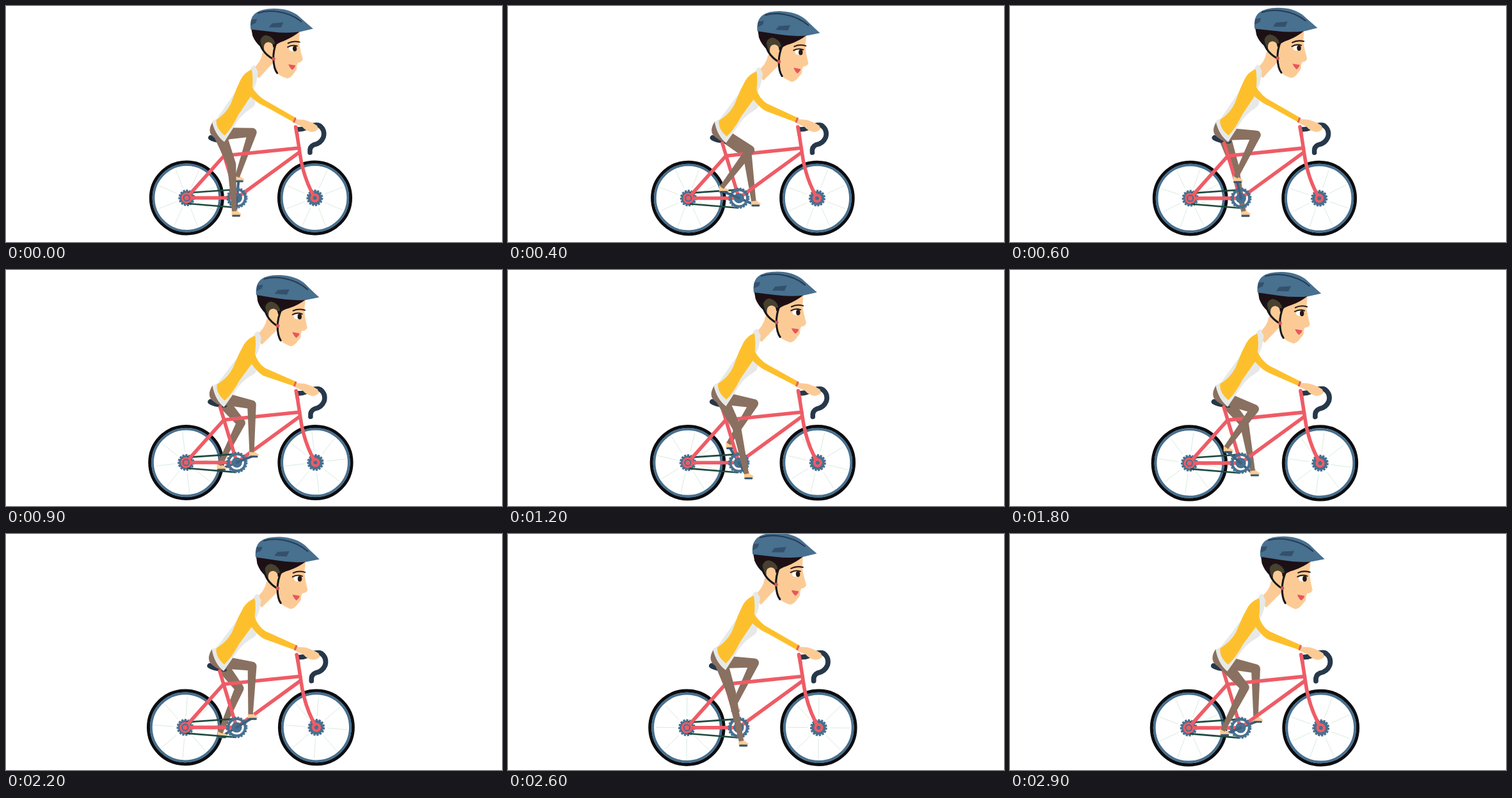
These frames come from a looping animation (775 px wide and 369 px high, 3 s). An HTML page:

```html
<!DOCTYPE html>
<html lang="en">
<head>
<meta charset="utf-8">
<title>Cyclist</title>
<style>
html, body { margin: 0; width: 100%; height: 100%; overflow: hidden; background: #fff; }
svg { display: block; width: 775px; height: 369px; }
.line { fill: none; stroke-linecap: round; stroke-linejoin: round; }
.red { stroke: #ee5c66; stroke-width: 5.5; }
.navy { stroke: #26384a; }
.chain { stroke: #1f4a3f; stroke-width: 2.6; }
.crank { stroke: #3c6280; stroke-width: 4; }
.spokes { fill: none; stroke: #cfe6d4; stroke-width: .8; }
.blue { fill: #48708f; }
.slit { fill: #34506c; }
.skin { fill: #fccb95; }
.pants { fill: #8a7060; }
.yellow { fill: #fdc02c; }
.white { fill: #e7e9e8; }
.hair { fill: #1d1015; }
.strap { stroke: #17171a; stroke-width: 3; }
</style>
</head>
<body>
<svg viewBox="0 0 775 369" xmlns="http://www.w3.org/2000/svg">
  <defs>
    <g id="wheel">
      <circle r="56" fill="none" stroke="#0d0d10" stroke-width="5"/>
      <circle r="51.8" fill="none" stroke="#48708f" stroke-width="3.8"/>
    </g>
    <g id="hub">
      <circle r="11" class="blue"/>
      <circle r="11.5" fill="none" stroke="#48708f" stroke-width="3" stroke-dasharray="3.2 1.6"/>
    </g>
    <g id="foot">
      <path class="skin" d="M-6-9L2-9L3-6L9-2L8 0L-6 0Z"/>
      <path class="line" stroke="#35566f" stroke-width="3" d="M-4 1H6"/>
    </g>
  </defs>
  <g id="scene">
    <use href="#wheel" x="282.3" y="300"/>
    <use href="#wheel" x="482.5" y="300"/>
    <path class="spokes" id="spokeA"/>
    <path class="spokes" id="spokeB"/>

    <path class="line crank" id="crankFar"/>
    <use href="#foot" id="footFar"/>
    <path class="pants" id="legFar"/>

    <use href="#hub" x="282.3" y="300"/>
    <use href="#hub" x="482.5" y="300"/>
    <path class="line chain" d="M285 292L358 287M285 309L358 315"/>
    <path class="line navy" stroke-width="8" d="M320 206Q325 210 342 211"/>
    <g class="line red">
      <path d="M335 214L360 297"/>
      <path d="M360 300H282L340 235"/>
      <path d="M342 234L458 222"/>
      <path d="M362 299L458 229"/>
      <path d="M453 190L459 229Q464 268 482.5 300"/>
    </g>
    <circle cx="282.3" cy="300" r="8.5" fill="#ee5c66"/>
    <circle cx="282.3" cy="300" r="4.6" fill="#ee5c66" stroke="#48708f" stroke-width="2"/>
    <circle cx="482.5" cy="300" r="7" fill="#ee5c66"/>
    <circle cx="482.5" cy="300" r="3" class="blue"/>
    <g transform="translate(361 300)">
      <circle r="13" fill="none" stroke="#48708f" stroke-width="4"/>
      <circle r="15.5" fill="none" stroke="#48708f" stroke-width="2" stroke-dasharray="3 1.9"/>
      <circle r="8" class="blue"/>
    </g>

    <path class="line navy" stroke-width="7.5" d="M456 193Q463 193 470 190Q484 184 490 187Q499 194 496 205Q492 215 481 217Q474 220 475 229"/>
    <path class="line red" d="M452.5 189L455 202"/>

    <path class="line crank" id="crankNear"/>
    <use href="#foot" id="footNear"/>
    <path class="pants" id="legNear"/>
    <path class="pants" d="M323 181Q315 194 321 202Q327 209 341 214L353 205L340 185Z"/>

    <g id="body">
      <path class="skin" d="M409 75L424 92L399 117L388 104Q404 92 406 78Z"/>
      <path class="white" d="M389 98L393 96L398 106Q396 124 390 134Q388 142 392 150Q393 159 386 163Q371 171 362 184L341 214Q327 203 323 181L331 177L380 112Z"/>
      <path class="yellow" d="M388 103Q377 107 371 117Q363 131 357 147Q350 167 330 179Q328 192 342 204Q353 194 365 172L384 146Q391 130 389 106Z"/>

      <path class="skin" d="M408 62L428 58L466 45L464 64L466 77L469 90Q467 95 461 95L459 100Q460 106 455 110Q449 119 443 119Q433 115 427 110L420 86L409 78Z"/>
      <path class="hair" d="M390 36L392 50Q396 61 404 68L409 71L414 63L424 70Q429 63 441 60Q455 55 467 46L466 42Z"/>
      <path fill="#48412f" d="M403 62Q404 51 413 50Q425 53 427 64L418 66L410 78Q404 71 403 62Z"/>
      <path class="skin" d="M409 72Q408 61 417 61Q425 63 423 72Q421 82 415 82Q410 80 409 72Z"/>
      <path class="line strap" d="M402 55Q403 76 423 88M429 61Q423 75 423 88Q423 103 428 110"/>
      <circle cx="423.3" cy="87.5" r="2.7" fill="#d5525a"/>

      <path class="blue" d="M389.5 40Q388 22 398 15Q407 8.500 427 9Q451 10 465 22Q474 31 487 43L467 47Q446 49 422 45Z"/>
      <path class="slit" d="M391 25L400 24L398 30L390 34Z"/>
      <path class="slit" d="M423 32L441 31L437 39L418 38Z"/>
      <path class="line" stroke="#263b55" stroke-width="2" d="M402 15Q416 11 432 14Q454 18 469 31"/>

      <path class="line" stroke="#2a1a1a" stroke-width="2" d="M447 64Q455 60 465 63"/>
      <ellipse cx="454" cy="73" rx="6" ry="4" fill="#fff"/>
      <ellipse cx="457" cy="73" rx="3.200" ry="4.300" fill="#22191b"/>
      <path class="line" stroke="#22191b" stroke-width="1.8" d="M446 70Q453 66 461 69"/>
      <path fill="#e95560" d="M446 97L457 99L456 102L452 106Q448 103 446 97Z"/>
    </g>

    <path class="yellow" id="sleeve"/>
    <path class="skin" d="M452 177L466 178Q477 181 486 187L488 192Q484 197 477 197Q468 195 463 189L450 183Z"/>
    <path class="line" stroke="#e3655a" stroke-width="3.200" d="M452 176L450 181"/>
  </g>
</svg>
<script>
const LOOP = 3000, STEP = 100, RAD = Math.PI / 180;
const CRANK = { x: 361, y: 300 }, HIP = { x: 334, y: 200 };
const ARM = 27, THIGH = 51, SHIN = 73.5;
const $ = id => document.getElementById(id);
const put = (id, name, value) => $(id).setAttribute(name, value);
const polar = (o, r, a) => ({ x: o.x + r * Math.cos(a), y: o.y + r * Math.sin(a) });

// Tapered limb between two joints
function taper(a, b, wa, wb) {
  const n = Math.atan2(b.y - a.y, b.x - a.x) + Math.PI / 2;
  const pts = [polar(a, wa, n), polar(b, wb, n), polar(b, -wb, n), polar(a, -wa, n)];
  return 'M' + pts.map(p => p.x.toFixed(2) + ' ' + p.y.toFixed(2)).join('L') + 'Z';
}

function disc(c, r) {
  return `M${c.x - r} ${c.y}a${r} ${r} 0 0 0 ${2 * r} 0a${r} ${r} 0 0 0 ${-2 * r} 0Z`;
}

// Two-bone leg following its pedal
function pedal(side, angle) {
  const p = polar(CRANK, ARM, angle);
  const ankle = { x: p.x - 2, y: p.y - 6 };
  const dx = ankle.x - HIP.x, dy = ankle.y - HIP.y, d = Math.hypot(dx, dy);
  const bend = Math.acos(Math.min(1, (THIGH * THIGH + d * d - SHIN * SHIN) / (2 * THIGH * d)));
  const knee = polar(HIP, THIGH, Math.atan2(dy, dx) - bend);
  put('leg' + side, 'd', taper(HIP, knee, 10, 6.8) + disc(knee, 6.8) + taper(knee, ankle, 6.8, 3.6));
  put('foot' + side, 'transform', `translate(${p.x} ${p.y})`);
  put('crank' + side, 'd', `M${CRANK.x} ${CRANK.y}L${p.x} ${p.y}`);
}

function spokes(id, x, y, turn) {
  let d = '';
  for (let i = 0; i < 8; i++) {
    const a = (turn + i * 45) * RAD;
    const p = polar({ x, y }, 17, a), q = polar({ x, y }, 47, a);
    d += `M${p.x} ${p.y}L${q.x} ${q.y}`;
  }
  put(id, 'd', d);
}

function sleeve(k) {
  const at = (x, y, dx, dy) => `${x + dx * k} ${y + dy * k} `;
  put('sleeve', 'd', 'M' + at(387, 128, -4, -3) +
    'Q' + at(393, 146, 1, -4) + at(405, 153, 1, -5) +
    'L453 175L450 182L' + at(404, 165, 1, -8) +
    'Q' + at(394, 161, 0, -8) + at(381, 143, -2, -4) + 'Z');
}

function draw(now) {
  const n = Math.floor((now % LOOP) / STEP + 1e-4);
  const turn = 95 + 27 * n;
  const lean = (Math.cos(2 * (turn - 85) * RAD) + .56) / 1.5;
  const zoom = 1 + .032 * n / 29;
  put('scene', 'transform', `translate(382.5 203) scale(${zoom}) translate(-382.5 -203)`);
  put('body', 'transform', `translate(0 ${-1.5 * lean}) rotate(${-2.4 * lean} 340 210)`);
  pedal('Near', turn * RAD);
  pedal('Far', (turn + 180) * RAD);
  sleeve(lean);
  spokes('spokeA', 282.3, 300, 24 + 21.6 * n);
  spokes('spokeB', 482.5, 300, 24 + 21.6 * n);
}

function tick(now) {
  draw(now);
  requestAnimationFrame(tick);
}
draw(0);
requestAnimationFrame(tick);
</script>
</body>
</html>
```
